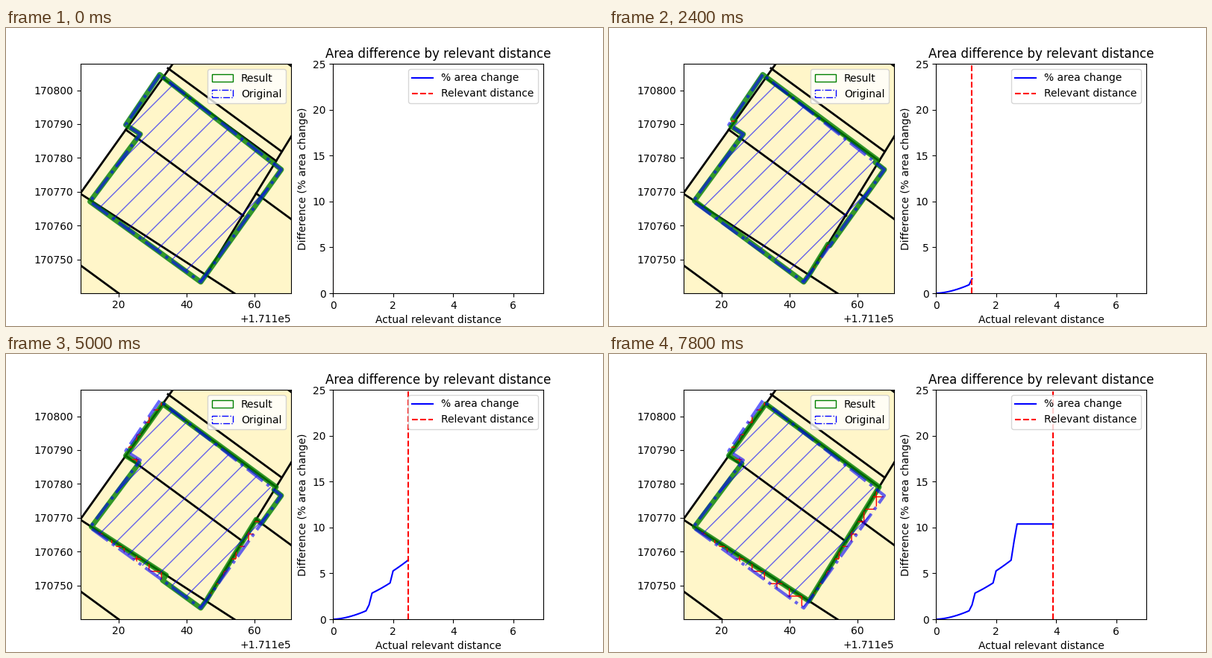
A matplotlib script that plays this animation: 800x400 px, repeating every 8 s.

```python
import numpy as np
import matplotlib.pyplot as plt
from matplotlib.animation import FuncAnimation
from matplotlib.patches import Patch, PathPatch, Polygon
from matplotlib.path import Path

FRAMES, INTERVAL, STEP = 40, 200, 0.1
SCALE = 4.54                                # pixels per metre on the map
WIDTH, HEIGHT, BASE = 281.82, 307.4, 355.7  # map box, in stage pixels
X0, Y0 = 171108.77, 170740.06               # lower left map corner


def world(points):
    """Turn stage pixels into map coordinates."""
    x, y = np.asarray(points, float).T
    return np.column_stack([X0 + (x - 100) / SCALE, Y0 + (BASE - y) / SCALE])


def mix(a, b, t):
    return a + (b - a) * t


def foot(p, a, b):
    """Nearest point to p on the line through a and b."""
    u = b - a
    return a + u * np.dot(p - a, u) / np.dot(u, u)


# Corners of the drawn parcel, in stage pixels
A, B, C, D, E, F = PARCEL = np.array([(206, 62.5), (160.5, 130), (180, 142.5),
                                      (112.5, 233), (261, 341), (369, 190)])
# Corners of the neighbouring boundaries: top, middle and bottom
TL, TR = np.array([(210, 67), (362, 178.5)])
ML, MC = np.array([(160.5, 136.5), (178, 147)])
BL, BR = np.array([(114.5, 232), (268, 331.5)])
GATE = 0.715                     # where a neighbour's fence meets BR-TR
FENCE = TR - TL                  # direction shared by the cross fences
LANE = np.array([7, -13])

# Cross fences: start and length, as a share of FENCE
FENCES = [(TL, 1), (TL + LANE, 1), (ML, 1.035), (mix(BR, TR, GATE), 0.4),
          (np.array([97, 316.5]), 0.4), (np.array([374, 45]), 0.1)]


def creep(d):
    """Area change that builds up steadily with the distance."""
    return 0.78 * np.minimum(d, 2.5) ** 1.7


# Distance at which a whole piece snaps over, and the percentage it adds
JUMPS = {1.2: 0.5, 1.3: 1.13, 2.0: 1.1, 2.6: 2.1, 2.7: 1.84}


def change(d):
    return creep(d) + sum(size * (d > at - STEP / 2)
                          for at, size in JUMPS.items())


def snap(d):
    """Ring of the snapped parcel and the slivers it lost at distance d."""
    d = round(d, 3)
    if d == 0:
        return list(PARCEL), []
    lost = []

    if d < 1.2:
        left = [C, B, A]
    elif d < 1.3:
        p, low = mix(ML, TL, 0.17), foot(ML, C, B)
        q = foot(p, A, B)
        left = [C, low, p, q, A]
        lost.append([B, low, p, q])
    else:
        left = [MC, ML, TL]
        lost.append([A, B, C, MC, ML, TL])

    p = mix(TL, TR, min(1, 0.82 * d))
    top = [p, foot(p, A, F), F] if d < 2.7 else [TR]

    if d < 2.7:
        p = mix(BR, TR, 0.225 * d if d < 2 else GATE)
        q = foot(p, E, F)
        right = [q, p, BR]
    else:
        p, q, right = TR, F, [BR]
    lost.append([BR, p, q])

    reach = max(0, 0.553 * (d - 1.32))
    if d < 2.6:
        p = mix(BL, BR, reach)
        q = foot(p, D, E)
        bottom = [E, q, p, BL] if reach else [E, BL]
    else:
        p, q, bottom = BR, E, [BL]
    if reach:
        lost.append([BL, p, q, D])
    return left + top + right + bottom, lost


fig, (area, chart) = plt.subplots(1, 2, figsize=(8, 4), dpi=100)

# map
area.set(xlim=(X0, X0 + WIDTH / SCALE), ylim=(Y0, Y0 + HEIGHT / SCALE),
         aspect="equal", facecolor="#fff6c9")
area.set_autoscale_on(False)
street = [mix(ML, TL, -1.4), mix(ML, TL, 1.4)]
area.add_patch(Polygon(world(street + [(80, 30)]), fc="white", zorder=0.5))

segments = [street, [BR, mix(BR, TR, 1.4)],
            [mix(BL, BR, -0.2), mix(BL, BR, 1.4)]]
segments += [[start, start + FENCE * size] for start, size in FENCES]
for segment in segments:
    area.plot(*world(segment).T, color="black", lw=2, zorder=1)

result = Polygon(world(PARCEL), fc="none", ec=(0, 0.5, 0, 0.8), lw=5,
                 joinstyle="round", zorder=1.2)
slivers = PathPatch(Path(world([A, B, A])), fc="none", ec="red", lw=0,
                    hatch="+", zorder=1.3)
drawn = Polygon(world(PARCEL), fc="none", ec=(0, 0, 1, 0.6), lw=3,
                ls="dashdot", hatch="/", joinstyle="round", zorder=1.4)
for patch in (result, slivers, drawn):
    area.add_patch(patch)
area.legend(handles=[
    Patch(fc="none", ec="green", label="Result"),
    Patch(fc="none", ec="blue", ls="dashdot", label="Original"),
], loc="upper right")

# chart
curve, = chart.plot([], [], "b-", label="% area change")
marker = chart.axvline(0, color="r", ls="--", label="Relevant distance")
chart.set(xlim=(0, 7), ylim=(0, 25), xlabel="Actual relevant distance",
          ylabel="Difference (% area change)",
          title="Area difference by relevant distance")
chart.legend(loc="upper right")


def draw(i):
    d = i * STEP
    ring, lost = snap(d)
    result.set_xy(world(ring))
    slivers.set_visible(bool(lost))
    if lost:
        slivers.set_path(Path.make_compound_path(
            *[Path(world(s + s[:1]), closed=True) for s in lost]))
    distances = np.arange(i + 1) * STEP
    curve.set_data(distances, change(distances))
    marker.set_xdata([d, d])
    return result, slivers, curve, marker


anim = FuncAnimation(fig, draw, frames=FRAMES, interval=INTERVAL,
                     repeat=True, blit=False)
plt.show()
```
